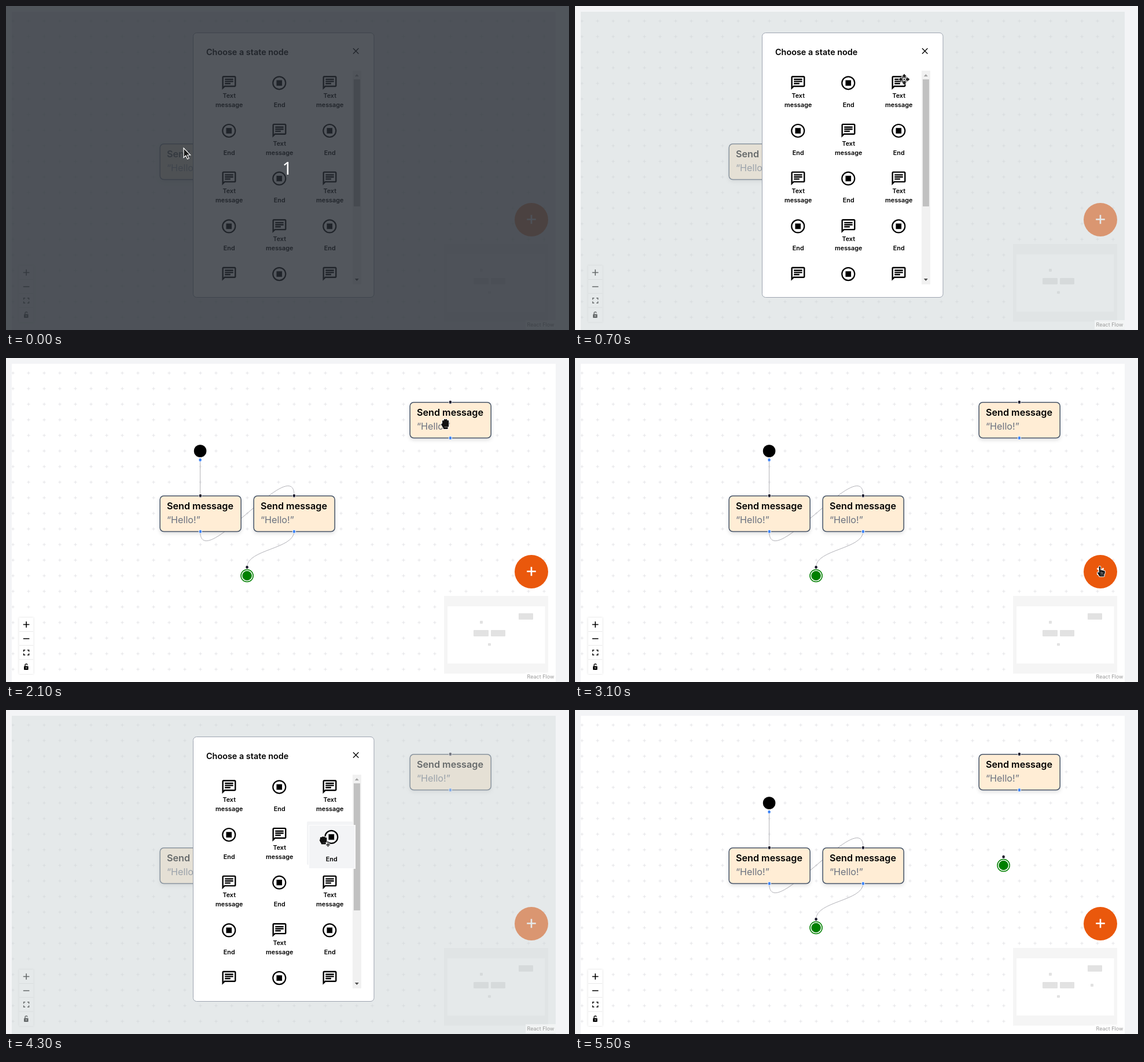
Recreate the animation shown at these times as an HTML page. Size 973 by 561 pixels, loop 5900 ms.

```html
<!DOCTYPE html>
<html lang="en">
<head>
<meta charset="utf-8">
<title>State flow editor</title>
<style>
  html, body { margin: 0; width: 100%; height: 100%; overflow: hidden; background: #f3f4f6; }
  svg { display: block; font-family: Inter, "Open Sans", sans-serif; }
  .title { font-size: 16.2px; font-weight: 600; }
  .sub { font-size: 16.2px; fill: #6b7280; }
  .head { font-size: 14.4px; font-weight: 600; }
  .label { font-size: 10.8px; font-weight: 600; text-anchor: middle; }
  .line { fill: none; stroke: #b1b1b7; }
  .card { fill: #ffedd5; stroke: #475569; stroke-width: 1.5; filter: drop-shadow(0 3px 3px rgba(0,0,0,.12)); }
</style>
</head>
<body>
<svg id="stage" width="973" height="561" viewBox="0 0 973 561"></svg>
<script>
const STEP = 100, LOOP = 5900;
const COLS = [346, 433, 520], TILE_W = 79, TILE_H = 75;
const rowY = r => 112.4 + 82.7 * r;
const isText = i => i % 2 === 0;

const rect = (x, y, w, h, attrs = '') => `<rect x="${x}" y="${y}" width="${w}" height="${h}" ${attrs}/>`;
const text = (x, y, cls, s) => `<text x="${x}" y="${y}" class="${cls}">${s}</text>`;
const group = (id, body, attrs = '') => `<g id="${id}" ${attrs}>${body}</g>`;

const handle = (x, y, color) =>
  rect(x - 2.6, y - 3, 5.2, 6, `rx="2.5" fill="${color}" stroke="#fff" stroke-width=".9"`);

const messageNode = (x, y) =>
  rect(x, y, 140, 61.8, 'rx="6.5" class="card"') +
  text(x + 11.7, y + 23.3, 'title', 'Send message') +
  text(x + 11.7, y + 47.3, 'sub', '“Hello!”') +
  handle(x + 69.7, y - .3, '#1a192b') + handle(x + 69.7, y + 61.8, '#3b82f6');

const endNode = (x, y) =>
  `<circle cx="${x}" cy="${y}" r="10.6" fill="#fff" stroke="green" stroke-width="1.5"/>
   <circle cx="${x}" cy="${y}" r="8.3" fill="green"/>` + handle(x, y - 14.8, '#1a192b');

const CHAT = 'M4 4h16v12H5.17L4 17.17V4m0-2c-1.1 0-1.99.9-1.99 2L2 22l4-4h14c1.1 0 2-.9 2-2V4c0-1.1-.9-2-2-2H4z' +
  'm2 10h8v2H6v-2zm0-3h12v2H6V9zm0-3h12v2H6V6z';

const tileFace = chat => chat
  ? `<path d="${CHAT}" transform="translate(25.1 6.2) scale(1.2)"/>` +
    text(39.7, 46.5, 'label', 'Text') + text(39.7, 62.5, 'label', 'message')
  : `<circle cx="39.3" cy="20.9" r="11" fill="none" stroke="#000" stroke-width="2.2"/>` +
    rect(34.5, 16.1, 9.6, 9.6) + text(39.7, 62.5, 'label', 'End');

const tiles = () => Array.from({ length: 15 }, (_, i) => {
  const bg = rect(0, 0, TILE_W, TILE_H, 'rx="2" fill="none" class="bg"');
  return group('tile' + i, bg + tileFace(isText(i)));
}).join('');

const minimap = () => {
  const mini = (x, y, w, h, attrs = '') => rect(x, y, w, h, 'rx="1" fill="#e2e2e2" ' + attrs);
  return rect(757, 412, 180, 134.5, 'fill="#f5f5f5"') + rect(763, 430, 168.5, 99, 'fill="#fff"') +
    mini(808, 471, 26, 11) + mini(838, 471, 25, 11) + mini(819, 455, 5, 5) + mini(833, 493.7, 5, 4.6) +
    mini(886, 442, 25, 11, 'class="later1"') + mini(891, 474, 5, 5, 'class="later2"');
};

const controls = () =>
  rect(22.5, 449.5, 25, 97.5, 'fill="#fff" style="filter:drop-shadow(0 0 1.5px rgba(0,0,0,.15))"') +
  `<path d="M23 473.5h24M23 497.7h24M23 522h24" stroke="#e8e8e8"/>
   <g fill="none" stroke="#000" stroke-width="1.6">
     <path d="M29.8 461.5h10.6M35.1 456.2v10.6M29.8 486h10.6"/>
     <path d="M30.6 508.4v-2.6h2.6M37 505.8h2.6v2.6M39.6 511.6v2.6H37M33.2 514.2h-2.6v-2.6" stroke-width="1.4"/>
     <path d="M33 534.5v-2.4a2 2 0 0 1 4 -.6" stroke-width="1.3"/>
   </g>` + rect(31, 533.6, 7.6, 6.4, 'rx="1"') + rect(34.2, 535.6, 1.4, 2, 'fill="#fff"');

const button = () =>
  `<circle cx="908" cy="370" r="29" fill="#ea580c"/>
   <path id="plus" d="M-7.8 0H7.8M0 -7.8V7.8" stroke="#fff" stroke-width="2.6"/>`;

const board = () =>
  rect(10, 10, 940, 551, 'fill="#fff"') + rect(10, 10, 940, 551, 'fill="url(#cross)"') +
  `<path class="line" d="M335.6 176V238M335.6 300C335.6 376 498 162 498 238M498 300C498 331 416.6 331 416.6 362"/>
   <circle cx="335.6" cy="161" r="10.8"/>` + handle(335.6, 176.4, '#3b82f6') +
  messageNode(266.2, 238.7) + messageNode(428.2, 238.7) + endNode(416.6, 377) +
  group('added1', messageNode(698.2, 76.7), 'class="later1"') +
  group('added2', endNode(740.6, 269), 'class="later2"') +
  controls() + minimap() + button();

const modal = () =>
  rect(323.5, 46.5, 312.5, 458, 'rx="6" fill="#fff" stroke="#9ca3af"') +
  text(346, 84.6, 'head', 'Choose a state node') +
  '<path d="M600 73.3l9.4 9.4M609.4 73.3l-9.4 9.4" stroke="#000" stroke-width="1.3"/>' +
  `<g clip-path="url(#list)">${tiles()}</g>` +
  rect(599, 112, 15, 370, 'fill="#f1f1f1"') + rect(601, 127, 11, 220, 'fill="#c1c1c1"') +
  '<path d="M602.8 122l3.5-4 3.5 4z" fill="#a3a3a3"/><path d="M602.8 472l3.5 4 3.5-4z" fill="#505050"/>';

// Cursor drawings, each around its hot spot
const FINGERS = 'M-3.6 4V-4.5M-.8 4V-6.8M2 4V-6.8M4.8 4V-4.8M-5.4 1l2.6 4.5M-2 7.5h5.5M-2 4h6';
const FIST = 'M-3.6 4V-2.5M-.8 4V-3.5M2 4V-3.5M4.8 4V-2M-4.6 1.5l2 3.5M-2 7h5.5M-2 3.5h6';
const POINT = 'M-1 6V-4M1.6 5V2M4.2 5V2.6M6.6 6V3.6M-3.8 6l3 5M0 11h5.5M-.5 8h6.5';
const hand = (d, w = 2.8) => ['#fff', '#111'].map((c, i) =>
  `<path d="${d}" fill="none" stroke="${c}" stroke-width="${i ? w : w + 2}" stroke-linecap="round" stroke-linejoin="round"/>`).join('');
const arms = [0, 90, 180, 270].map(a =>
  `<path d="M-4 -4.8L0 -9.4L4 -4.8H1.2V-3H-1.2V-4.8z" transform="rotate(${a})"/>`).join('');
const cursors = {
  arrow: '<path d="M0 0V16.5L3.8 13L6.5 19L9.2 17.8L6.6 12H11.6z" fill="#1b1b1b" stroke="#fff" stroke-width="1.2"/>',
  move: `<g fill="#1b1b1b" stroke="#fff" stroke-width="1.2" paint-order="stroke">${arms}</g>` +
    rect(-3.2, -3.2, 6.4, 6.4, 'fill="#fff" stroke="#1b1b1b"') + rect(-1.2, -1.2, 2.4, 2.4, 'fill="#1b1b1b"'),
  grab: hand(FINGERS),
  point: hand(POINT, 2.4),
  drag: hand(FIST, 3.2) +
    '<path d="M4.5 9.5h8M8.5 5.5v8" stroke="#fff" stroke-width="3.4"/><path d="M5 9.5h7M8.5 6v7" stroke="#111" stroke-width="1.4"/>'
};

const stage = document.getElementById('stage');
stage.innerHTML =
  `<defs>
    <pattern id="cross" x="-1.5" y="12.5" width="27" height="27" patternUnits="userSpaceOnUse">
      <path d="M10.8 13.5h5.4M13.5 10.8v5.4" stroke="#e3e3e6"/>
    </pattern>
    <clipPath id="list">${rect(340, 112, 259, 370)}</clipPath>
  </defs>` +
  rect(0, 0, 973, 561, 'fill="#f3f4f6"') + board() +
  group('open', rect(10, 10, 940, 551, 'fill="rgb(204,212,214)" opacity=".5"') + modal()) +
  rect(898, 544, 52, 15.5, 'fill="#fff" opacity=".5"') +
  '<text x="900.5" y="555" font-size="9" fill="#999">React Flow</text>' +
  group('ghostText', rect(.5, .5, 80, 75, 'fill="#f3f4f6" stroke="#fff"') + tileFace(true)) +
  group('ghostEnd', rect(.5, .5, 80, 75, 'fill="#f3f4f6" stroke="#fff"') + tileFace(false)) +
  group('count', rect(0, 0, 973, 561, 'fill="rgb(40,45,53)" opacity=".8"') +
    '<text x="486" y="291.5" font-size="30" fill="#fff" text-anchor="middle" style="font-family:\'Noto Sans\',\'Open Sans\',sans-serif">1</text>') +
  group('cursor', Object.entries(cursors).map(([k, body]) => group('cur-' + k, body)).join(''));

const $ = id => document.getElementById(id);
const show = (el, on) => { el.style.display = on ? '' : 'none'; };
const place = (el, x, y, more = '') => el.setAttribute('transform', `translate(${x} ${y}) ${more}`);

// step, x, y, cursor kind from that step on
const PATH = [
  [0, 307, 246, 'arrow'], [2, 309, 245, 'arrow'], [4, 350, 195, 'arrow'], [5, 420, 140, 'move'],
  [6, 505, 106, 'arrow'], [7, 569, 127, 'move'], [9, 560, 140, 'move'], [10, 555, 143, 'move'],
  [11, 563, 142, 'drag'], [12, 603, 136, 'drag'], [16, 717, 114, 'drag'], [18, 747, 110, 'drag'],
  [19, 755, 113, 'move'], [20, 759, 114, 'move'], [21, 759, 114, 'grab'], [24, 759, 114, 'grab'],
  [25, 768, 130, 'grab'], [29, 903, 355, 'point'], [30, 908, 366, 'point'], [33, 908, 366, 'point'],
  [34, 908, 345, 'point'], [35, 907, 322, 'arrow'], [36, 890, 295, 'arrow'], [37, 800, 230, 'arrow'],
  [38, 640, 150, 'arrow'], [39, 430, 104, 'arrow'], [40, 290, 100, 'arrow'], [41, 420, 190, 'arrow'],
  [42, 547, 223, 'move'], [43, 548, 224, 'drag'], [48, 745, 267, 'drag'], [49, 745, 267, 'move'],
  [51, 745, 267, 'grab'], [52, 745, 267, 'grab'], [53, 680, 200, 'grab'], [54, 385, 33, 'grab'], [59, 385, 33, 'grab']
];

function cursorAt(k) {
  const i = PATH.findIndex((p, n) => k >= p[0] && (n === PATH.length - 1 || k < PATH[n + 1][0]));
  const a = PATH[Math.max(i, 0)], b = PATH[i + 1] || a;
  const u = b[0] > a[0] ? (k - a[0]) / (b[0] - a[0]) : 0;
  return { x: a[1] + (b[1] - a[1]) * u, y: a[2] + (b[2] - a[2]) * u, kind: a[3] };
}

function hoveredTile(k) {
  if (k >= 8 && k < 21) return 2;
  if (k >= 42 && k < 51) return 5;
  const p = cursorAt(Math.max(k - 1, 0));
  const col = COLS.findIndex(x => p.x >= x && p.x <= x + TILE_W);
  const row = [0, 1, 2, 3, 4].findIndex(r => p.y >= rowY(r) && p.y <= rowY(r) + TILE_H);
  return col < 0 || row < 0 ? -1 : row * 3 + col;
}

function buttonAngle(k) {
  if (k < 29 || k > 37) return 0;
  return k === 29 ? 22 : k === 37 ? 25 : 45;
}

function render(k) {
  const p = cursorAt(k), hover = hoveredTile(k);
  show($('count'), k === 0);
  show($('open'), k < 21 || (k >= 32 && k < 51));
  stage.querySelectorAll('.later1').forEach(el => show(el, k >= 21));
  stage.querySelectorAll('.later2').forEach(el => show(el, k >= 51));
  for (let i = 0; i < 15; i++) {
    const tile = $('tile' + i), on = i === hover;
    place(tile, COLS[i % 3], rowY(Math.floor(i / 3)) - (on ? 2 : 0));
    tile.querySelector('.bg').setAttribute('fill', on ? '#f3f4f6' : 'none');
  }
  const dragging = p.kind === 'drag';
  show($('ghostText'), dragging && k < 21);
  show($('ghostEnd'), dragging && k > 21);
  place($('ghostText'), p.x - 35, p.y - 31);
  place($('ghostEnd'), p.x - 25, p.y - 25);
  place($('plus'), 908, 369.5, `rotate(${buttonAngle(k)})`);
  place($('cursor'), p.x, p.y);
  show($('cursor'), k < 55);
  for (const kind in cursors) show($('cur-' + kind), kind === p.kind);
}

const start = performance.now();
let last = -1;
function tick(now) {
  const k = Math.floor(Math.max(now - start, 0) % LOOP / STEP);
  if (k !== last) render(last = k);
  requestAnimationFrame(tick);
}
tick(start);
</script>
</body>
</html>
```
